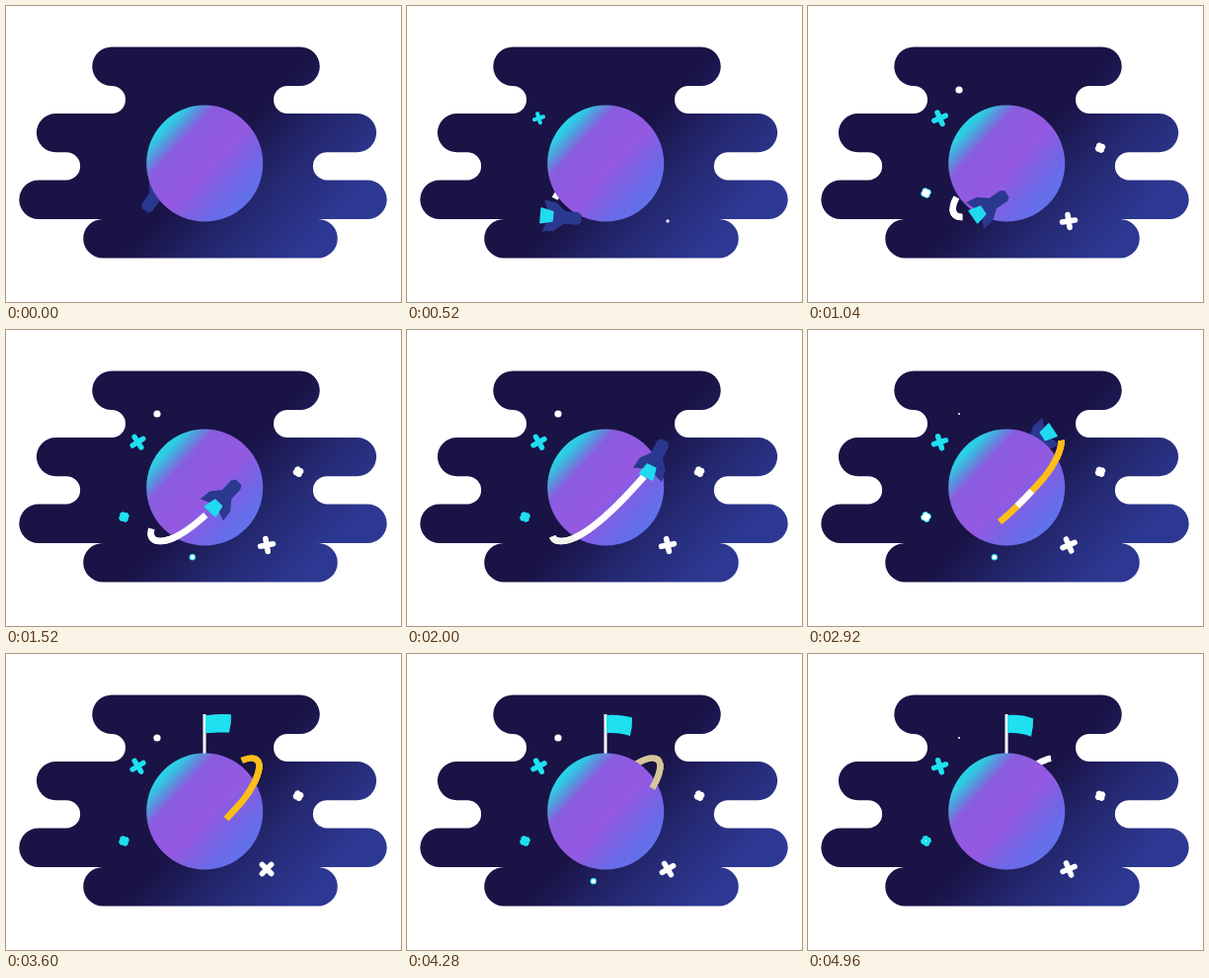
Animation, 400 px wide and 300 px high, one loop 5000 ms. Source, as an HTML page:

```html
<!DOCTYPE html>
<html lang="en">
<head>
<meta charset="utf-8">
<title>Planet orbit</title>
<style>
html, body { margin: 0; width: 100%; height: 100%; overflow: hidden; background: #fff; }
svg { display: block; width: 100vw; height: 100vh; }
</style>
</head>
<body>
<svg viewBox="0 0 400 300">
  <defs>
    <linearGradient id="sky" gradientUnits="userSpaceOnUse" x1="190" y1="176" x2="285" y2="264">
      <stop offset="0" stop-color="#191346"/>
      <stop offset=".5" stop-color="#252972"/>
      <stop offset="1" stop-color="#2d3892"/>
    </linearGradient>
    <linearGradient id="globe" gradientUnits="userSpaceOnUse" x1="139" y1="129" x2="236" y2="219">
      <stop offset="0" stop-color="#20e0ee"/>
      <stop offset=".1" stop-color="#2fcbe4"/>
      <stop offset=".17" stop-color="#5499dc"/>
      <stop offset=".26" stop-color="#8a5cdf"/>
      <stop offset=".55" stop-color="#9459e1"/>
      <stop offset=".8" stop-color="#6c68e6"/>
      <stop offset="1" stop-color="#5d76ee"/>
    </linearGradient>
  </defs>
  <path id="cloud" fill="url(#sky)"/>
  <g id="stars"></g>
  <g id="flag">
    <path id="pole" stroke="#fff" stroke-width="3"/>
    <path id="cloth" fill="#1fe0f0"/>
  </g>
  <g id="back" fill="none" stroke-width="6.600"></g>
  <circle cx="201.200" cy="159.600" r="59" fill="url(#globe)"/>
  <g id="front" fill="none" stroke-width="6.600"></g>
  <g id="ship">
    <path fill="#2b388f" d="M22-4V4L18 6.500H5L-5 14.500L-17 16L-13 6V-6L-17-16L-5-14.500L5-6.500H18Z"/>
    <path fill="#22daef" stroke="#22daef" stroke-width="2" stroke-linejoin="round" d="M-7.500-4.500V4.500L-19 7.200V-7.200Z"/>
  </g>
</svg>
<script>
const LOOP = 5000, CYAN = '#1fe0f0', WHITE = '#fff';
const ORBIT = 'M180 158C171 168 160 180 151 193C145 203 144 214 156 214' +
  'C176 214 207 186 239.500 149C250 136 257 121 256.500 112C255 103 245 104 233 111C222 118 205 135 190 152';
const $ = id => document.getElementById(id);
const clamp = (v, lo, hi) => Math.min(hi, Math.max(lo, v));
const ramp = (t, a, b) => { const u = clamp((t - a) / (b - a), 0, 1); return u * u * (3 - 2 * u); };

function add(parent, tag, attrs) {
  const el = document.createElementNS('http://www.w3.org/2000/svg', tag);
  for (const k in attrs) el.setAttribute(k, attrs[k]);
  return parent.appendChild(el);
}

// Each semicircle joins two straight edges; inner ones bend the other way
const bow = (dy, outward) => `a${Math.abs(dy) / 2} ${Math.abs(dy) / 2} 0 0 ${outward} 0 ${dy}`;
$('cloud').setAttribute('d', 'M107 41.500H298' + bow(39.5, 1) + 'H285' + bow(28, 0) + 'H355.500' + bow(39.2, 1) +
  'H325' + bow(28.3, 0) + 'H366' + bow(39.4, 1) + 'H316' + bow(39.5, 1) + 'H98' + bow(-39.5, 1) +
  'H33' + bow(-39.4, 1) + 'H61' + bow(-28.3, 0) + 'H50.500' + bow(-39.2, 1) + 'H107' + bow(-28, 0) + bow(-39.5, 1) + 'Z');

const makeLine = parent => add(parent, 'path', { d: ORBIT, stroke: WHITE });
const backLine = makeLine($('back')), backGap = makeLine($('back'));
const frontLine = makeLine($('front')), frontGap = makeLine($('front'));
const total = backLine.getTotalLength();

// Distance along the orbit of the spot nearest to (x, y)
function along(x, y) {
  let best = 0, min = Infinity;
  for (let s = 0; s <= total; s += 0.5) {
    const p = backLine.getPointAtLength(s), d = Math.hypot(p.x - x, p.y - y);
    if (d < min) { min = d; best = s; }
  }
  return best;
}

// Travel along the orbit, passing [time, x, y] stops at even speed between them
function route(...stops) {
  const keys = stops.map(([t, x, y]) => [t, along(x, y)]);
  return t => {
    let i = 0;
    while (i < keys.length - 2 && t > keys[i + 1][0]) i++;
    const [t0, s0] = keys[i], [t1, s1] = keys[i + 1];
    return s0 + (s1 - s0) * clamp((t - t0) / (t1 - t0), 0, 1);
  };
}

const shipAt = route([0, 153, 189], [1040, 183, 203], [2000, 250, 131], [2920, 232, 111.5], [3350, 203, 137]);
const tailAt = route([0, 165, 175], [1040, 151, 194], [2000, 147.5, 209], [4960, 246, 106]);
const headAt = route([0, 165, 175], [1040, 156, 214], [2000, 240, 149], [2920, 256.5, 112], [4960, 205, 135]);
const gapStart = route([2000, 170, 211], [3150, 222, 170]);
const gapEnd = route([2000, 248, 139], [3150, 222, 170]);
const nearEnd = along(147, 205), farEnd = along(256.5, 112);
const shipIn = along(147, 211), shipOut = along(251, 106);

// White warms to yellow and cools again, dimmer on the way
function tint(t) {
  const heat = ramp(t, 1900, 2500) - ramp(t, 3850, 4650), dim = Math.sin(Math.PI * heat);
  return `rgb(${[255 - 2 * heat - 40 * dim, 255 - 65 * heat - 30 * dim, 255 - 231 * heat].map(Math.round)})`;
}

function span(line, a, b, color) {
  const show = b > a;
  line.setAttribute('visibility', show ? 'visible' : 'hidden');
  if (!show) return;
  line.setAttribute('stroke', color);
  line.setAttribute('stroke-dasharray', `0 ${a} ${b - a} ${total + 10}`);
}

function trail(lineBack, lineFront, a, b, color) {
  span(lineBack, a, b, color);
  span(lineFront, Math.max(a, nearEnd), Math.min(b, farEnd), color);
}

function cross(arm, width, color) {
  const g = add($('stars'), 'g', {});
  add(g, 'path', { d: `M${-arm} 0H${arm}M0 ${-arm}V${arm}`, stroke: color, 'stroke-width': width, 'stroke-linecap': 'round' });
  return g;
}
function dot(color, r) {
  const g = add($('stars'), 'g', {});
  add(g, 'circle', { r, fill: color });
  return g;
}
function place(el, x, y, size, turn) {
  el.setAttribute('transform', `translate(${x} ${y}) rotate(${turn}) scale(${size})`);
}
const bigCyan = cross(6.3, 5.4, CYAN), bigWhite = cross(6.5, 5.6, WHITE);
const smallCyan = cross(2.3, 6.2, CYAN), smallCore = cross(2, 5, WHITE);
const smallWhite = cross(2.3, 6.2, WHITE), topDot = dot(WHITE, 3.6);
const lowDot = dot(CYAN, 3.2);
add(lowDot, 'circle', { r: 2.2, fill: WHITE });

// 1 around the 2920 ms beat and its repeats, 0 away from them
function pulse(t, period, near, far) {
  const turns = (t - 2920) / period;
  return 1 - ramp(Math.abs(turns - Math.round(turns)) * period, near, far);
}

function drawStars(t) {
  const wave = Math.sin(t / 350);
  place(bigCyan, 133.5, 113.7, ramp(t, 250, 650), -25 + 8 * wave);
  const lurch = Math.exp(-(((t - 3650) / 650) ** 2));
  place(bigWhite, 264, 218, ramp(t, 400, 800), -5 - 0.0035 * t - 28 * lurch);
  const small = ramp(t, 550, 950);
  place(smallCyan, 119.5, 189.5, small, -22 + 8 * wave);
  place(smallCore, 119.5, 189.5, small * pulse(t, 1880, 40, 200), -22 + 8 * wave);
  place(smallWhite, 296, 143.7, ramp(t, 600, 1080), -22 - 8 * wave);
  place(topDot, 153, 85, ramp(t, 600, 950) * (1 - 0.72 * pulse(t, 2040, 0, 160)), 0);
  place(lowDot, 188.8, 230.3, ramp(t, 1200, 1300) * pulse(t, 1360, 60, 300), 0);
}

function drawFlag(t) {
  const rise = ramp(t, 3050, 3350), open = ramp(t, 3250, 3520);
  $('flag').setAttribute('visibility', rise > 0 ? 'visible' : 'hidden');
  const top = 104 - 43 * rise, x = 202, y = top + 1.2, w = 26 * open;
  const dy = 1.4 - 2.4 * Math.cos((t - 3600) / 1000 * 2 * Math.PI);
  $('pole').setAttribute('d', `M201 ${top}V104`);
  $('cloth').setAttribute('d', `M${x} ${y}C${x + w * 0.35} ${y - 1} ${x + w * 0.65} ${y - 1 + dy * 0.4} ${x + w} ${y + dy}` +
    `Q${x + w * 1.02} ${y + 9 + dy} ${x + w * 0.92} ${y + 18.5 + dy}` +
    `C${x + w * 0.65} ${y + 17.5 + dy * 0.4} ${x + w * 0.35} ${y + 17.5} ${x} ${y + 18}Z`);
}

function drawShip(t) {
  const s = shipAt(t), ship = $('ship');
  const [a, p, b] = [s - 3, s, s + 3].map(d => backLine.getPointAtLength(d));
  const angle = Math.atan2(b.y - a.y, b.x - a.x) * 180 / Math.PI;
  ship.setAttribute('transform', `translate(${p.x} ${p.y}) rotate(${angle})`);
  const layer = s > shipIn && s < shipOut ? $('front') : $('back');
  if (ship.parentNode !== layer) layer.appendChild(ship);
}

function draw(t) {
  drawStars(t);
  drawFlag(t);
  const tail = tailAt(t), head = headAt(t);
  trail(backLine, frontLine, tail, head, tint(t));
  const open = t > 2000;
  trail(backGap, frontGap, open ? Math.max(tail, gapStart(t)) : 0, open ? Math.min(head, gapEnd(t)) : 0, WHITE);
  drawShip(t);
}

const start = performance.now();
function tick() {
  draw((performance.now() - start) % LOOP);
  requestAnimationFrame(tick);
}
tick();
</script>
</body>
</html>
```
